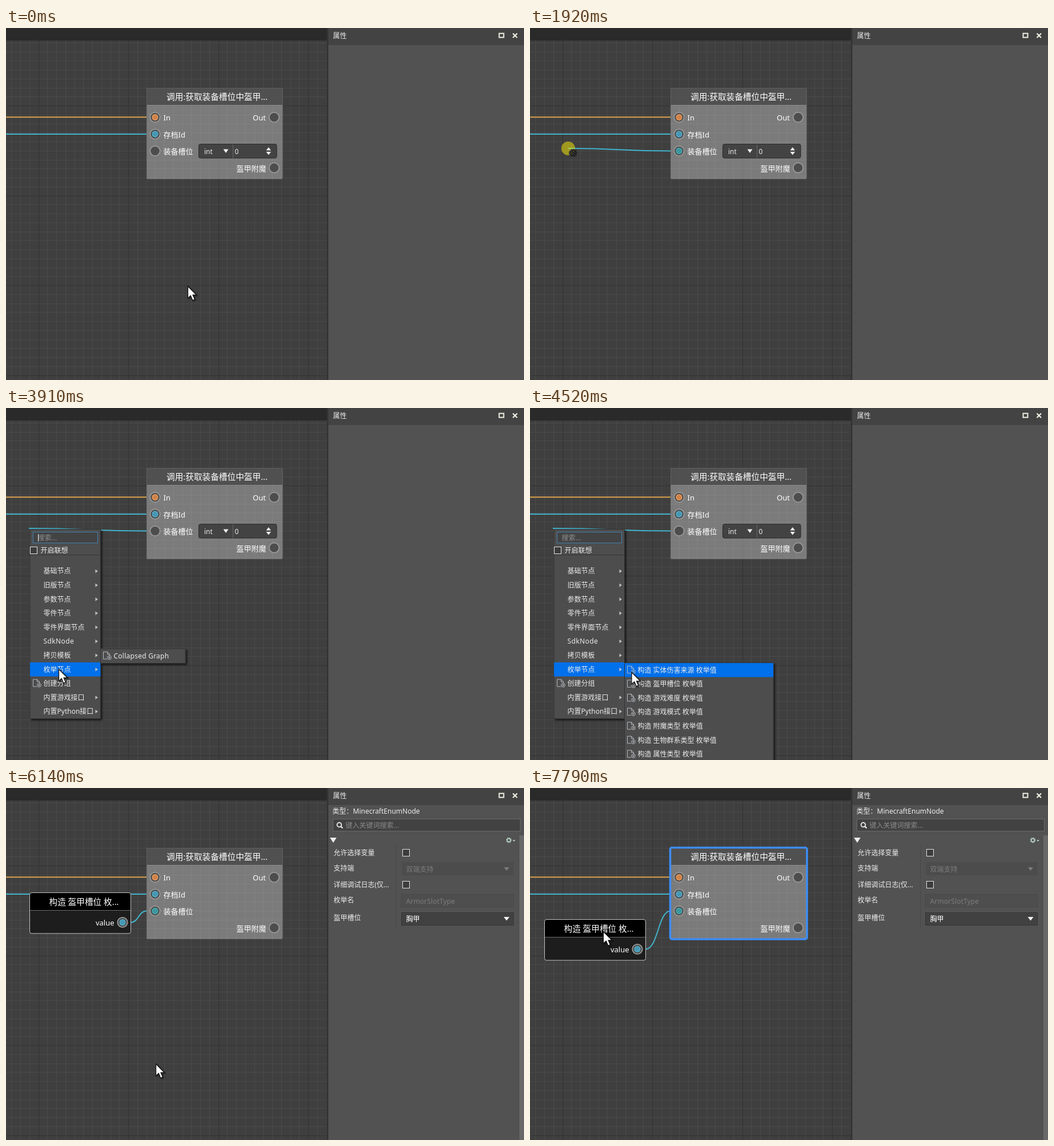
Write an HTML page that moves like this. It is 907 px wide and 617 px high and loops after 8000 ms.

```html
<!DOCTYPE html>
<html lang="zh-CN">
<head>
<meta charset="utf-8">
<style>
html,body{margin:0;width:100%;height:100%;overflow:hidden;background:#3f3f3f}
svg{display:block;width:100%;height:100%}
text{font-family:"Noto Sans","Noto Sans CJK SC","Noto Sans CJK",sans-serif;font-size:12px;fill:#ececec;white-space:pre}
.title{font-size:14.67px;fill:#fff}
.label{font-size:13px;fill:#fff}
</style>
</head>
<body>
<svg id="stage" viewBox="0 0 907 617" xmlns="http://www.w3.org/2000/svg"></svg>
<script>
const LOOP = 8000;
const BLUE = '#41b3cd';

// --- markup helpers ---
const rect = (x, y, w, h, fill, more = '') =>
  `<rect x="${x}" y="${y}" width="${w}" height="${h}" fill="${fill}" ${more}/>`;
const text = (x, y, s, more = '') => `<text x="${x}" y="${y}" ${more}>${s}</text>`;
const path = (d, more) => `<path d="${d}" ${more}/>`;
const group = (id, body, more = '') => `<g id="${id}" ${more}>${body}</g>`;
const circle = (x, y, r, more) => `<circle cx="${x}" cy="${y}" r="${r}" ${more}/>`;
const stroke = (color, width = 1) => `fill="none" stroke="${color}" stroke-width="${width}"`;

const pin = (x, y) => circle(x, y, 8.7, 'fill="#4d4d4d" stroke="#999" stroke-width="1.8"');
const plug = (x, y, fill, edge, id = '') =>
  circle(x, y, 4.9, `id="${id}" fill="${fill}" stroke="${edge}" stroke-width="1.2"`);
const down = (x, y, w, h, fill) =>
  path(`M${x - w / 2} ${y}h${w}l${-w / 2} ${h}z`, `fill="${fill}"`);
const checkbox = (x, y) => rect(x, y, 12, 12, '#3c3c3c', 'stroke="#e4e4e4"');
const pageIcon = (x, y) =>
  path(`M${x + 7} ${y + 13}h-6.5v-12.5h7l4 4v3M${x + 7.5} ${y + .5}v4h4`, stroke('#b4b8be')) +
  circle(x + 11, y + 10.5, 3.4, stroke('#b4b8be')) +
  path(`M${x + 9} ${y + 10.5}h4M${x + 11} ${y + 8.5}v4`, stroke('#b4b8be'));

function grid() {
  const step = 15.75, x0 = 9.75, y0 = 26.25;
  let minor = '', major = '';
  for (let k = 0; x0 + k * step < 562; k++) {
    const d = `M${Math.floor(x0 + k * step) + .5} 22V617`;
    k % 10 === 3 ? major += d : minor += d;
  }
  for (let k = 0; y0 + k * step < 617; k++) {
    const d = `M0 ${Math.floor(y0 + k * step) + .5}H562`;
    k % 10 === 7 ? major += d : minor += d;
  }
  return path(minor, stroke('#4a4a4a')) + path(major, stroke('#323232'));
}

function callNode() {
  return rect(246, 105, 238.5, 160, '#fff', 'rx="3" fill-opacity=".31"') +
    path('M246 136V108q0-3 3-3H481.500q3 0 3 3V136z', 'fill="#4e4e4e" fill-opacity=".95"') +
    path('M246 135.500H484.500', stroke('#979797')) +
    rect(246.500, 105.500, 237.500, 159, 'none', 'rx="3" stroke="#686868" stroke-opacity=".6"') +
    text(281, 125.500, '调用:获取装备槽位中盔甲...', 'class="title"') +
    pin(261, 156.500) + plug(261, 156.500, '#cf8248', '#ef9f60') + text(275.500, 162, 'In', 'class="label"') +
    pin(469.500, 156.500) + text(455, 162, 'Out', 'class="label" text-anchor="end"') +
    pin(261, 186) + plug(261, 186, '#4797b2', '#53b4d4') + text(275.500, 191.500, '存档Id', 'class="label"') +
    pin(261, 215.500) + plug(261, 215.500, '#3f959c', '#43b5be', 'slotPlug') +
    text(275.500, 221, '装备槽位', 'class="label"') +
    pin(469.500, 245) + text(455.500, 250.500, '盔甲附魔', 'class="label" text-anchor="end"') +
    group('valueBox',
      rect(337.500, 203.500, 136.500, 24.500, '#434343', 'rx="3" stroke="#292929"') +
      path('M397.500 204V228', stroke('#686868')) +
      text(347, 220.500, 'int') + down(385, 212.500, 9, 6.500, '#f2f2f2') + text(400.500, 220.500, '0') +
      path('M455.500 214.500h8.500l-4.250-5.500z', 'fill="#eee"') + down(459.750, 217, 8.500, 5.500, '#eee')) +
    rect(245.500, 104.500, 239.500, 160.500, 'none', 'id="hoverEdge" rx="3" stroke="#3d8df5" stroke-width="3.500"');
}

function enumNode() {
  return rect(41.500, 183.500, 177, 71.500, '#1d1d1d', 'rx="3.500"') +
    path('M41.500 214V187q0-3.500 3.500-3.500H215q3.500 0 3.500 3.500V214z', 'fill="#000"') +
    path('M41.500 214.500H218.500', stroke('#6c6c6c')) +
    rect(41.500, 183.500, 177, 71.500, 'none', 'rx="3.500" stroke="#c4c4c4"') +
    text(75.500, 205, '构造 盔甲槽位 枚...', 'class="title"') +
    text(189.500, 241, 'value', 'class="label" text-anchor="end"') +
    pin(204, 235.500) + plug(204, 235.500, '#4797b2', '#4fb2d0');
}

function panelBase() {
  return rect(0, 0, 562, 22, '#2a2a2a') + rect(561.500, 0, 3, 617, '#323232') +
    rect(564.500, 0, 343, 30, '#434343') + rect(564.500, 30, 343, 587, '#525252') +
    text(572.500, 18, '属性') +
    rect(863.500, 9.500, 8, 7, 'none', 'stroke="#f0efe2" stroke-width="2"') +
    path('M887.500 9.500l7.500 7.500m0-7.500l-7.500 7.500', stroke('#f0efe2', 2.2));
}

function properties() {
  const labels = [[118, '允许选择变量'], [145, '支持端'], [174, '详细调试日志(仅...'], [201, '枚举名'], [232, '盔甲槽位']];
  return text(571.500, 44.500, '类型：MinecraftEnumNode') +
    rect(572.500, 54.500, 328, 21, '#424242', 'stroke="#696969"') +
    circle(583.500, 64.500, 3.8, stroke('#f2f2f2', 1.8)) + path('M586.200 67.200l3.300 3.300', stroke('#f2f2f2', 2)) +
    text(594.500, 69.500, '键入关键词搜索...', 'style="fill:#8b8b8b"') +
    rect(899, 83, 8, 534, '#686868') +
    down(573, 87, 11.500, 9, '#ededed') +
    circle(880.500, 91.500, 2.9, stroke('#b9cfc2', 1.6)) +
    circle(880.500, 91.500, 4.2, stroke('#b9cfc2', 1.4) + ' stroke-dasharray="1.6 1.7"') +
    down(889.500, 91, 4.500, 3, '#b9cfc2') +
    path('M683.500 100V245', stroke('#474747')) +
    labels.map(([y, s]) => text(573.500, y, s)).join('') +
    checkbox(694.500, 107.500) + checkbox(694.500, 163.500) +
    rect(693, 130, 196, 23, '#4c4c4c', 'rx="1"') + text(700.500, 146.500, '双端支持', 'style="fill:#7c7c7c"') +
    down(876.500, 139, 9, 6, '#7d7d7d') +
    rect(692.500, 186.500, 196, 22, '#4e4e4e', 'stroke="#474747"') +
    text(700.500, 202.500, 'ArmorSlotType', 'style="fill:#7c7c7c" letter-spacing=".13"') +
    rect(692.500, 218.500, 196, 22, '#414141', 'stroke="#353535"') +
    text(700.500, 234, '胸甲', 'style="fill:#fff"') + down(876.500, 226, 10, 6.500, '#f4f4f4');
}

// --- menus ---
const ROW = 24.6, MENU_TOP = 273.7, SUB_TOP = 447;
const items = ['基础节点', '旧版节点', '参数节点', '零件节点', '零件界面节点', 'SdkNode',
  '拷贝模板', '枚举节点', '创建分组', '内置游戏接口', '内置Python接口'];
const enums = ['实体伤害来源', '盔甲槽位', '游戏难度', '游戏模式', '附魔类型', '生物群系类型', '属性类型'];

const box = (x, y, w, h) =>
  rect(x, y, w, h, '#4d4d4d', 'filter="url(#shadow)"') +
  rect(x + .5, y + .5, w - 1, h - 1, '#4d4d4d', 'stroke="#333"');
const bar = (id, x, w) => rect(x, 0, w, ROW, '#0070eb', `id="${id}"`);

function mainMenu() {
  const rows = items.map((s, i) => {
    const y = MENU_TOP + ROW * (i + .5);
    const mark = i === 8 ? pageIcon(47, y - 7.5) : path(`M156.500 ${y - 3.2}v6.400l4.300-3.200z`, 'fill="#c4c4c4"');
    return text(65.500, y + 4.3, s, i === 5 ? 'letter-spacing=".4"' : '') + mark;
  });
  return box(41.500, 212, 124.500, 333) +
    rect(47.500, 217.500, 113, 19, '#434343', 'stroke="#4181b3"') +
    text(55.500, 231.500, '搜索...', 'style="fill:#8f8f8f"') +
    rect(56, 221, 1, 13, '#ddd', 'id="caret"') +
    checkbox(42.500, 243.500) + text(60.500, 253.500, '开启联想') +
    path('M42 257.500H165.500', stroke('#363636')) +
    bar('mainBar', 42, 123.500) + rows.join('');
}

const graphMenu = () => box(165, 421.500, 149.500, 26.500) + pageIcon(170, 427) +
  text(188.500, 438.500, 'Collapsed Graph', 'letter-spacing=".25"');

const enumMenu = () => box(165, 446, 261.500, 190) + bar('enumBar', 166, 260) +
  enums.map((s, i) => {
    const y = SUB_TOP + ROW * (i + .5);
    return pageIcon(170, y - 7.5) + text(188.500, y + 4.3, `构造 ${s} 枚举值`);
  }).join('');

const arrow = path('M.5.700V21.500L5.300 17.200L8.700 25.300L12.400 23.700L9.100 16H15.600z',
  'fill="#fff" stroke="#141414" stroke-width="1.300" filter="url(#soft)"');
const dragMark = circle(9, 8.500, 6.5, 'fill="#222" fill-opacity=".7" stroke="#0c0c0c" stroke-width="2.600"') +
  circle(9, 8.500, 6.8, stroke('#ddd') + ' stroke-dasharray="1.500 1.500"') +
  path('M4.500 4l9 9', stroke('#0c0c0c', 3)) + path('M4.500 4l9 9', stroke('#ddd') + ' stroke-dasharray="1.500 1.500"');

const stage = document.getElementById('stage');
stage.innerHTML =
  `<defs><filter id="shadow" x="-20%" y="-20%" width="140%" height="140%">
    <feDropShadow dx="2.500" dy="2.500" stdDeviation="1.500" flood-color="#000" flood-opacity=".65"/></filter>
    <filter id="soft" x="-30%" y="-30%" width="170%" height="170%">
    <feDropShadow dx="2" dy="1.500" stdDeviation="1.200" flood-color="#000" flood-opacity=".45"/></filter></defs>` +
  rect(0, 0, 907, 617, '#3f3f3f') + grid() +
  path('M0 156.300H246', stroke('#dca24c', 2)) + path('M0 186H246', stroke(BLUE, 2)) +
  path('', `id="link" ${stroke(BLUE, 2)}`) +
  callNode() + group('enumNode', enumNode()) +
  panelBase() + group('props', properties()) +
  group('menu', mainMenu()) + group('graphMenu', graphMenu()) + group('enumMenu', enumMenu()) +
  circle(0, 0, 12, 'id="halo" fill="#fff200"') +
  group('arrow', arrow) + group('drag', dragMark);

const el = {};
stage.querySelectorAll('[id]').forEach(n => { if (n.id) el[n.id] = n; });

// --- timeline ---
const keys = [
  [0, 318, 452], [30, 318, 452], [420, 265, 208], [620, 265, 208], [760, 263, 207], [980, 263, 207],
  [1250, 212, 226], [1780, 94, 211], [1920, 67, 211], [2130, 42, 211], [2800, 42, 211],
  [3000, 47, 297], [3630, 92, 444], [3700, 92, 445], [3910, 92, 457], [4240, 92, 457],
  [4800, 262, 468], [4930, 262, 468], [5210, 268, 487], [5600, 268, 487], [5880, 262, 483],
  [6140, 262, 483], [6450, 270, 230], [6700, 124, 200], [6910, 144, 204], [6940, 144, 204],
  [7260, 128, 251], [LOOP, 128, 251]];
const presses = [[420, 760], [1020, 2520], [5610, 5810], [6930, 7790]];

const slope = (i, c) => keys[i + 1] && keys[i]
  ? (keys[i + 1][c] - keys[i][c]) / (keys[i + 1][0] - keys[i][0]) : 0;

// Smooth through keys without overshooting them.
function tangent(i, c) {
  const a = slope(i - 1, c), b = slope(i, c);
  return a * b > 0 ? 2 * a * b / (a + b) : 0;
}

function pointer(t) {
  let i = 0;
  while (i < keys.length - 2 && t >= keys[i + 1][0]) i++;
  const h = keys[i + 1][0] - keys[i][0], u = (t - keys[i][0]) / h, v = 1 - u;
  return [1, 2].map(c =>
    keys[i][c] * v * v * (1 + 2 * u) + keys[i + 1][c] * u * u * (3 - 2 * u) +
    h * u * v * (tangent(i, c) * v - tangent(i + 1, c) * u));
}

const show = (node, on) => node.setAttribute('display', on ? 'inline' : 'none');
const move = (node, x, y) => node.setAttribute('transform', `translate(${x} ${y})`);
const within = (t, a, b) => t >= a && t < b;

function placeBar(node, top, count, y, on) {
  const row = Math.floor((y - top) / ROW);
  show(node, on && row >= 0 && row < count);
  node.setAttribute('y', top + row * ROW);
}

function draw(t) {
  const [x, y] = pointer(t);
  const dragging = within(t, 1020, 2450), linked = t >= 5810;
  const dx = t > 6910 ? x - 144 : 0, dy = t > 6910 ? y - 204 : 0;

  show(el.enumNode, linked);
  move(el.enumNode, dx, dy);
  show(el.props, linked);
  show(el.valueBox, !linked);
  show(el.slotPlug, dragging || linked);
  show(el.hoverEdge, t >= 6420);

  show(el.link, t >= 1020);
  const sx = linked ? 218.5 + dx : dragging ? x : 40;
  const sy = linked ? 235.5 + dy : dragging ? y : 211;
  const mid = (sx + 246) / 2;
  el.link.setAttribute('d', `M${sx} ${sy}C${mid} ${sy} ${mid} 215.5 246 215.5`);

  show(el.menu, within(t, 2450, 5680));
  el.menu.setAttribute('opacity', Math.min(1, (t - 2450) / 200));
  show(el.caret, t >= 3620 && Math.floor((t - 3620) / 530) % 2 === 0);
  show(el.graphMenu, within(t, 3700, 4110));
  show(el.enumMenu, within(t, 4110, 5680));
  const inSub = t > 4110 && x > 166;
  placeBar(el.mainBar, MENU_TOP, items.length, inSub ? 457 : y, true);
  placeBar(el.enumBar, SUB_TOP, enums.length, y, inSub);

  const press = presses.find(([a, b]) => within(t, a, b));
  show(el.halo, press);
  if (press) el.halo.setAttribute('opacity', press[1] - t <= 130 ? .25 : .5);
  move(el.halo, x, y);
  show(el.arrow, !dragging);
  show(el.drag, dragging);
  move(el.arrow, x, y);
  move(el.drag, x, y);
}

const start = performance.now();
function tick() {
  draw((performance.now() - start) % LOOP);
  requestAnimationFrame(tick);
}
tick();
</script>
</body>
</html>
```
